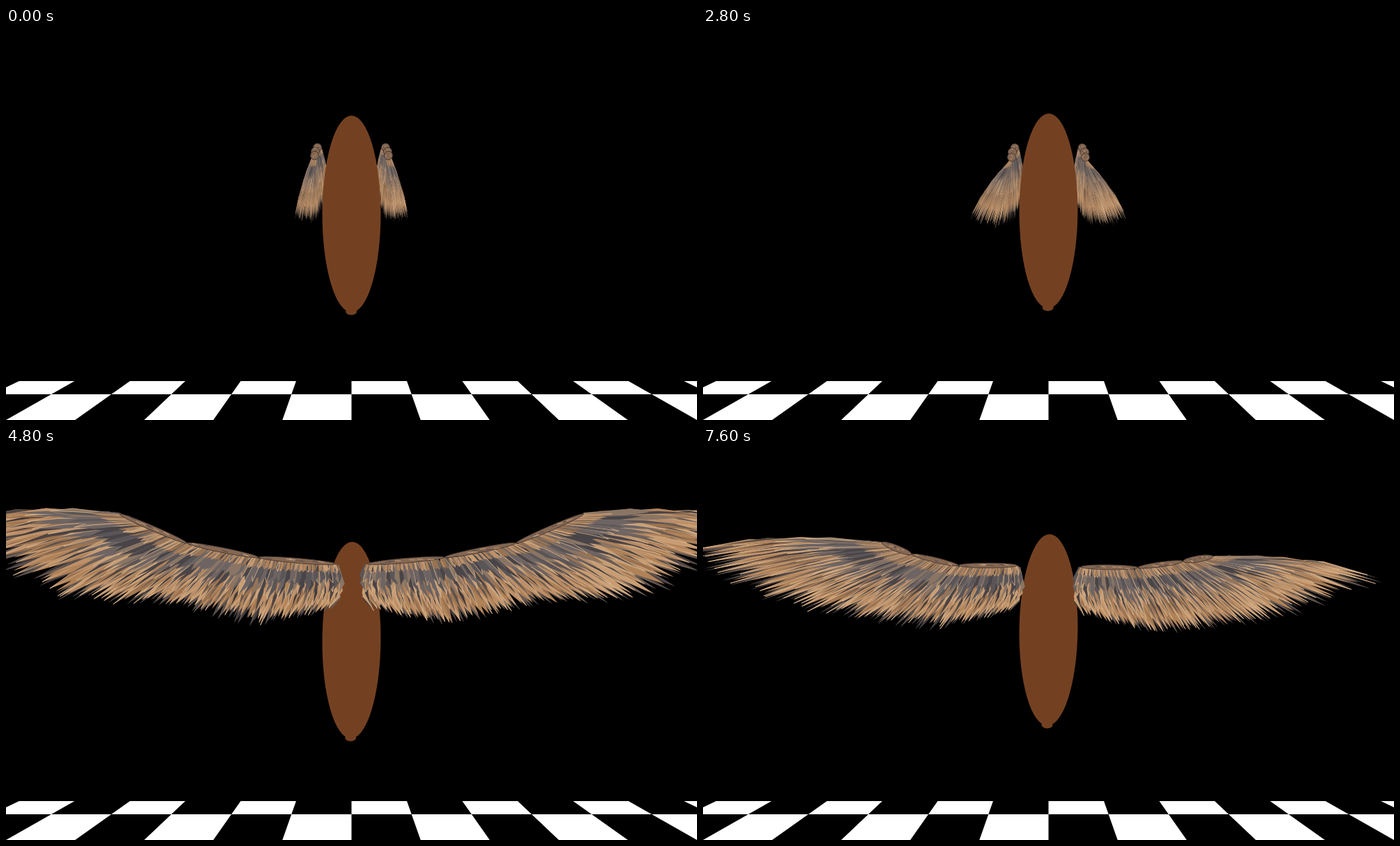
An HTML page for the animation above (8000 ms loop, 993 px wide and 564 px high).

```html
<!DOCTYPE html>
<html lang="en">
<head>
<meta charset="utf-8">
<title>Wings</title>
<style>
  html, body { margin: 0; width: 100%; height: 100%; overflow: hidden; background: #000; }
  svg { display: block; }
</style>
</head>
<body>
<svg width="993" height="564" viewBox="0 0 993 564">
  <rect width="993" height="564"/>
  <path id="floor" fill="#fff"/>
  <g id="scene"></g>
</svg>
<script>
const W = 993, MID = 496.5, STEP = 400, STEPS = 20;

// A wing is four joints from the shoulder out, then five points on its trailing edge.
const mirror = p => p.map((v, i) => i % 2 ? v : W - v);
const pose = (left, right = mirror(left)) => [left, right];

const shut = pose([453,172, 442,174, 447,183, 440,186, 462,225, 455,262, 446,281, 430,281, 414,277]);
const hang = pose([453,171, 443,176, 446,183, 441,191, 458,250, 447,278, 432,288, 405,288, 382,277]);
const glide = pose([455,179, 368,171, 282,175, 195,173, 430,243, 330,268, 190,281, 95,288, -45,238]);
const wide = pose([474,168, 363,167, 260,165, 163,150, 462,238, 355,268, 230,264, 60,274, -110,168]);
const fan = pose(
  [453,170, 428,178, 413,175, 424,159, 455,255, 435,268, 405,266, 362,262, 328,246],
  [543,170, 550,173, 560,171, 566,179, 540,258, 552,272, 575,272, 598,271, 652,262]);
const cup = pose(
  [453,170, 418,187, 382,187, 360,163, 485,243, 452,276, 400,283, 342,279, 290,226],
  [543,170, 570,193, 594,195, 598,179, 505,235, 548,285, 590,288, 640,290, 677,244]);
const sweep = pose(
  [452,170, 367,170, 300,154, 257,137, 436,240, 330,264, 215,250, 70,218, -45,152],
  [543,172, 625,173, 690,164, 733,157, 550,245, 652,270, 740,262, 835,250, 990,193]);

// Each beat: start pose, end pose, mix, lift of the outer wing.
const beats = [
  [shut, shut, 0], [shut, hang, .1], [fan, hang, .1], [cup, sweep, .55], [glide, glide, 0],
  [glide, sweep, .4], [sweep, cup, .45], [hang, hang, 0], [fan, hang, .3], [cup, sweep, .35],
  [cup, sweep, .55], [wide, wide, 0], [wide, wide, 0, 54], [sweep, cup, .42], [fan, fan, 0],
  [fan, cup, .1], [cup, cup, 0], [cup, sweep, .5], [wide, sweep, .5], [sweep, sweep, 0]
];
const tops = [126,127,128,136,139,136,130,123,123,126,130,139,135,126,121,120,120,123,123,124];

const TAN = ['#bd9069', '#b08258', '#c89d73', '#9c7350'];
const DARK = ['#4c4341', '#5d524d', '#3f393b', '#6b5d54'];
const GREY = ['#5a5557', '#6d6463', '#494447', '#8a7564'];
const CREAM = '#dfb88f';

// Feather rows, longest first.
const rows = [
  { n: 78, from: .1, to: 1, fat: .75, main: DARK, half: DARK, edge: .15 },
  { n: 70, from: .08, to: .95, fat: .8, main: TAN, half: TAN, edge: .5 },
  { n: 58, from: .05, to: .8, fat: .6, main: TAN, half: DARK, edge: .5 },
  { n: 52, from: .02, to: .58, fat: .75, main: GREY, half: TAN, edge: .5 },
  { n: 46, from: 0, to: .38, fat: .75, main: GREY, half: GREY, edge: .4 },
  { n: 56, from: 0, to: .17, fat: .6, main: TAN, half: GREY, edge: .2 }
];

const mix = (a, b, k) => a + (b - a) * k;
const f1 = v => v.toFixed(1);

function randomizer(seed) {
  return () => {
    seed = (seed * 16807) % 2147483647;
    return seed / 2147483647;
  };
}

function along(pts, u) {
  const last = pts.length / 2 - 1;
  const i = Math.max(0, Math.min(last - 1, Math.floor(u * last)));
  const k = u * last - i, j = i * 2;
  return [mix(pts[j], pts[j + 2], k), mix(pts[j + 1], pts[j + 3], k)];
}

function path(pts, fill, extra = '') {
  return `<path d="M${pts.map(p => f1(p[0]) + ' ' + f1(p[1])).join('L')}Z" fill="${fill}"${extra}/>`;
}

function wing(pts, side) {
  const bones = pts.slice(0, 8), tips = pts.slice(8);
  const spread = Math.min(1, Math.abs(tips[8] - bones[0]) / 200);
  const rnd = randomizer(side > 0 ? 4177 : 9431);
  const pick = list => list[Math.floor(rnd() * list.length)];
  let out = '';

  // Point at fraction f of the feather at u; the outer feathers bow away.
  const at = (u, f) => {
    const [bx, by] = along(bones, u), [tx, ty] = along(tips, u);
    const dx = tx - bx, dy = ty - by, len = Math.hypot(dx, dy) || 1;
    const c = 2 * u - 1;
    const bow = side * Math.min(13, len * .2) * spread * c * Math.abs(c) * Math.sin(Math.PI * f);
    return [bx + dx * f - dy / len * bow, by + dy * f + dx / len * bow];
  };

  for (const row of rows) {
    for (let i = 0; i < row.n; i++) {
      const u = Math.min(1, Math.max(0, (i + rnd() * .7) / (row.n - 1)));
      const end = row.to * (.88 + .12 * rnd());
      const mid = mix(row.from, end, .68);
      const a = at(u, row.from), m = at(u, mid), t = at(u, end);
      const dx = t[0] - a[0], dy = t[1] - a[1], len = Math.hypot(dx, dy) || 1;
      const nx = -dy / len, ny = dx / len;
      const lo = at(Math.max(0, u - .03), mid), hi = at(Math.min(1, u + .03), mid);
      const span = Math.min(1, u + .03) - Math.max(0, u - .03);
      const gap = Math.abs((hi[0] - lo[0]) * nx + (hi[1] - lo[1]) * ny) / span / row.n;
      const w = Math.max(.45, Math.min(9, gap * row.fat * (.8 + .5 * rnd())));
      const off = (p, k) => [p[0] + nx * w * k, p[1] + ny * w * k];
      const main = pick(row.main), half = pick(row.half);
      const lit = rnd() < row.edge;
      out += path([off(a, .7), off(m, 1), t, off(m, -1), off(a, -.7)], main);
      out += path([a, off(m, side), t, m], half,
        lit ? ` stroke="${CREAM}" stroke-width="${f1(Math.min(.8, w * .3))}"` : '');
    }
  }
  return out + arm(bones, rnd);
}

function arm(b, rnd) {
  let out = '';
  for (let i = 0; i < 6; i += 2) {
    const x = (b[i] + b[i + 2]) / 2, y = (b[i + 1] + b[i + 3]) / 2;
    const dx = b[i + 2] - b[i], dy = b[i + 3] - b[i + 1], len = Math.hypot(dx, dy);
    const rx = Math.max(6, len / 2), ry = Math.max(3.5, 6.5 - len / 22);
    const turn = Math.atan2(dy, dx) * 180 / Math.PI;
    out += `<g transform="translate(${f1(x)} ${f1(y - 1)}) rotate(${f1(turn)})">` +
      `<ellipse rx="${f1(rx)}" ry="${f1(ry)}" fill="#856751" stroke="#3c3230" stroke-width=".8"/>`;
    for (let k = 0; k < 8; k++) {
      const px = (rnd() * 1.5 - .75) * rx, py = (rnd() - .5) * ry;
      out += `<path d="M${f1(px)} ${f1(py)}l${f1(rx * .16)} 1" stroke="${k % 2 ? '#c39c7b' : '#55494a'}"/>`;
    }
    out += '</g>';
  }
  return out;
}

function torso(step) {
  const top = tops[step], h = top > 134 ? 287 : 287 - .4 * step;
  const ry = (h - 4) / 2, cy = top + ry;
  return `<g fill="#734122" transform="rotate(${f1(step * .035)} ${MID} ${cy})">` +
    `<ellipse cx="${MID}" cy="${cy}" rx="42" ry="${ry}"/>` +
    `<ellipse cx="${MID - .3}" cy="${top + h - 5}" rx="8" ry="5"/></g>`;
}

function blend(step, side) {
  const [a, b, k, lift = 0] = beats[step];
  const pts = a[side].map((v, i) => mix(v, b[side][i], k));
  return pts.map((v, i) => i % 2 ? v - lift * Math.min(1, ((pts[i - 1] - MID) / 333) ** 2) : v);
}

function draw(step) {
  const wings = wing(blend(step, 0), 1) + wing(blend(step, 1), -1);
  const behind = [shut, hang, fan].includes(beats[step][0]);
  const body = torso(step);
  document.getElementById('scene').innerHTML = behind ? wings + body : body + wings;
}

function layFloor() {
  const cell = y => 79.6 + (y - 508) * 19.7 / 56;
  let d = '';
  [[508, 527], [527, 564]].forEach(([y0, y1], r) => {
    for (let k = -8 + r; k < 8; k += 2) {
      const x = (n, y) => f1(MID + n * cell(y));
      d += `M${x(k, y0)} ${y0}H${x(k + 1, y0)}L${x(k + 1, y1)} ${y1}H${x(k, y1)}Z`;
    }
  });
  document.getElementById('floor').setAttribute('d', d);
}

let shown = -1;
function tick() {
  const step = Math.floor(performance.now() / STEP) % STEPS;
  if (step !== shown) draw(shown = step);
  requestAnimationFrame(tick);
}

layFloor();
tick();
</script>
</body>
</html>
```
